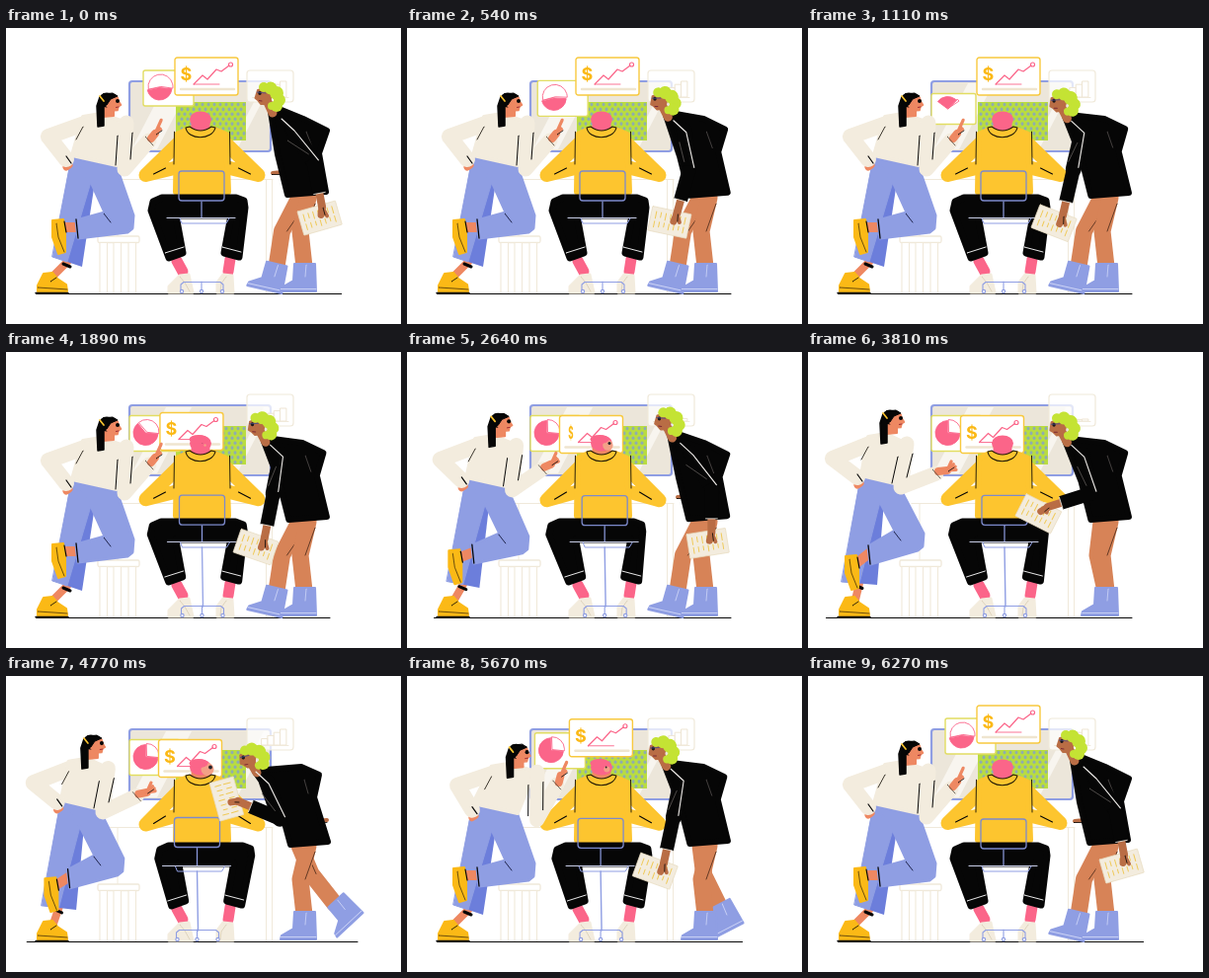
An HTML page with a canvas for the animation above (6300 ms loop, 400x300 px).

```html
<!DOCTYPE html>
<html lang="en">
<head>
<meta charset="utf-8">
<title>Team at a screen</title>
<style>
html, body { margin: 0; width: 100%; height: 100%; overflow: hidden; background: #fff; }
canvas { display: block; width: 400px; height: 300px; }
</style>
</head>
<body>
<canvas id="stage"></canvas>
<script>
const LOOP = 6300, STEP = 30;
const canvas = document.getElementById('stage');
const c = canvas.getContext('2d');
const ratio = window.devicePixelRatio || 1;
canvas.width = 400 * ratio;
canvas.height = 300 * ratio;

const BLUE = '#8f9ee3', DARK_BLUE = '#6c7edb', CREAM = '#f3ecde', LINE = '#f0e9da',
  YELLOW = '#fdc52f', GOLD = '#fbb916', BLACK = '#060606', PINK = '#fb6589',
  LIME = '#c4e334', CORAL = '#ee8862', BROWN = '#d78357', DEEP = '#b96d45', WHITE = '#fff';

// Motion helpers
const ease = (t, a, b) => {
  const u = Math.min(1, Math.max(0, (t - a) / (b - a)));
  return u * u * (3 - 2 * u);
};
const bump = (t, a, b, d, e) => ease(t, a, b) - ease(t, d, e);
const lerp = (a, b, u) => a.map((v, i) => v + (b[i] - v) * u);
const add = (p, x, y) => [p[0] + x, p[1] + y];

// Eases through a list of [time, pose] pairs
function follow(t, keys) {
  const i = Math.max(1, keys.findIndex(k => k[0] > t));
  const [a, from] = keys[i - 1], [b, to] = keys[i];
  return lerp(from, to, ease(t, a, b));
}

// Bent limb: the joint lies to the right of the line from root to tip
function joint(root, tip, upper, lower) {
  const dx = tip[0] - root[0], dy = tip[1] - root[1];
  const d = Math.min(Math.hypot(dx, dy), upper + lower);
  const along = (upper * upper - lower * lower + d * d) / (2 * d);
  const out = Math.sqrt(Math.max(0, upper * upper - along * along));
  const len = Math.hypot(dx, dy);
  return [root[0] + (dx * along + dy * out) / len, root[1] + (dy * along - dx * out) / len];
}

// Poses of the right woman: hand x, hand y, paper tilt, bend of the back
const OUT = [320, 181, -.28, 0], IN = [258, 190, .37, .47],
  REACH = [243, 157, .47, .47], SHOW = [235, 127, 1.3, 1];
// Her free foot: x, y, tilt
const STRIDE = [274, 238, .22], TOGETHER = [301, 238, 0], KICK = [333, 227, -.75];

function pose(t) {
  const [handX, handY, tilt, bend] = follow(t, [[0, OUT], [800, IN], [1700, IN], [3000, OUT],
    [3810, REACH], [4500, SHOW], [4850, SHOW], [5600, IN], [6250, OUT], [LOOP + 1, OUT]]);
  return {
    hand: [handX, handY], tilt, bend,
    paper: [handX - 5.5 * Math.cos(tilt) - 10.5 * Math.sin(tilt),
      handY - 5.5 * Math.sin(tilt) + 10.5 * Math.cos(tilt)],
    foot: follow(t, [[0, STRIDE], [2800, STRIDE], [3700, TOGETHER], [3950, TOGETHER],
      [4650, KICK], [5350, KICK], [6270, STRIDE], [LOOP + 1, STRIDE]]),
    lean: ease(t, 2000, 3250) - 1.45 * ease(t, 4560, 5600) + .45 * ease(t, 5650, 6270),
    sway: ease(t, 1400, 3300) - 2.5 * ease(t, 3300, 4800) + 1.5 * ease(t, 4900, LOOP),
    turn: .8 * bump(t, 1700, 2300, 2900, 3500) + bump(t, 4100, 4700, 5200, 6100),
    pole: bump(t, 1400, 2000, 5990, 6200),
    cardLow: bump(t, 1350, 2010, 5250, 5990),
    pieLow: bump(t, 100, 1000, 5310, 6270),
    pieHalf: bump(t, 500, 1050, 1150, 1700),
    share: .45 + .28 * bump(t, 1200, 2400, 5650, 6250),
    spin: Math.cos(2 * Math.PI * ease(t, 2400, 3300)),
    bars: .8 - .7 * bump(t, 1500, 2800, 3900, 4700)
  };
}

// Drawing helpers
function path(pts, close) {
  c.beginPath();
  for (let i = 0; i < pts.length; i += 2) c.lineTo(pts[i], pts[i + 1]);
  if (close) c.closePath();
}
function line(pts, color, width = 1) {
  path(pts);
  c.strokeStyle = color;
  c.lineWidth = width;
  c.stroke();
}
function poly(pts, color, soft = 0) {
  path(pts, true);
  c.fillStyle = color;
  c.fill();
  if (soft) {
    c.strokeStyle = color;
    c.lineWidth = soft;
    c.stroke();
  }
}
function oval(x, y, rx, ry, color) {
  c.beginPath();
  c.ellipse(x, y, rx, ry, 0, 0, 7);
  c.fillStyle = color;
  c.fill();
}
function box(x, y, w, h, r, fill, stroke, width = 1) {
  c.beginPath();
  c.roundRect(x, y, w, h, r);
  if (fill) { c.fillStyle = fill; c.fill(); }
  if (stroke) { c.strokeStyle = stroke; c.lineWidth = width; c.stroke(); }
}
function at(x, y, angle, draw) {
  c.save();
  c.translate(x, y);
  c.rotate(angle);
  draw();
  c.restore();
}

function drawScreen() {
  box(125, 54, 143, 71, 3, '#ece6da');
  for (const [x, w] of [[127, 26], [226, 8]])
    poly([x, 123, x + 35, 56, x + 35 + w, 56, x + w, 123], '#f8f5ef');
  box(125, 54, 143, 71, 3, null, BLUE, 2.2);
  box(172, 75, 71, 39, 0, '#b9dc40');
  for (let row = 0; row < 8; row++)
    for (let x = 175 + row % 2 * 3; x < 242; x += 6) oval(x, 77.5 + row * 4.9, 1.5, 1.8, '#8fadae');
}

function drawBars(p) {
  box(244, 43, 47, 32, 3, 'rgba(255,255,255,.75)', LINE, 1.2);
  for (let i = 0; i < 4; i++) {
    const h = (8 + i * 4) * p.bars;
    box(259 + i * 6.3, 70 - h, 6, h, 0, WHITE, '#eee5d3', 1);
  }
  line([249, 70.5, 286, 70.5], LINE);
}

function drawPie(p) {
  const x = 139 - 14 * p.pieLow, y = 43 + 21.5 * p.pieLow;
  box(x, y + 2 * p.pieHalf, 51 - 6 * p.pieHalf, 36 - 5 * p.pieHalf, 2, WHITE, '#e2dd62', 1.4);
  const wedge = (from, to, px, py, fill) => {
    c.beginPath();
    c.moveTo(px, py);
    c.arc(px, py, 12.5, from, to);
    c.closePath();
    c.fillStyle = fill;
    c.fill();
    c.strokeStyle = PINK;
    c.lineWidth = .9;
    c.stroke();
  };
  const px = x + 16.5, py = y + 17.5, full = 2 * Math.PI;
  const from = .1 - 2.6 * p.pieHalf, to = from + full * p.share * (1 - .4 * p.pieHalf);
  const end = from + full - 4.4 * p.pieHalf;
  wedge(to, Math.max(to, end), px + 1, py - 1, WHITE);
  wedge(from, to, px, py, PINK);
}

function drawChart(p) {
  at(171 - 16.5 * p.cardLow, 30 + 34.5 * p.cardLow, 0, () => {
    box(0, 0, 64, 38, 2.5, WHITE, '#f8c93f', 1.4);
    line([19, 27, 45, 27], PINK, .9);
    line([19, 27, 28, 18, 33, 22, 42, 12, 47, 14, 55, 8], PINK, 1.2);
    c.beginPath();
    c.arc(56.5, 7, 2, 0, 7);
    c.fillStyle = WHITE;
    c.fill();
    c.stroke();
    line([6, 32, 60, 32], '#efe5cf', 2.4);
    c.translate(11.5, 23);
    c.scale(p.spin, 1);
    c.font = '700 18px Inter, Arial, sans-serif';
    c.textAlign = 'center';
    c.fillStyle = GOLD;
    c.fillText('$', 0, 0);
  });
}

function drawFurniture() {
  line([105, 153.5, 270, 153.5], LINE, 1.2);
  line([113, 154, 113, 211], LINE);
  for (const x of [263.5, 269.5]) line([x, 154, x, 269], LINE);
  box(93, 211, 42, 6.5, 1.5, WHITE, LINE, 1.3);
  for (const x of [95, 109, 124]) box(x, 217.5, 7.5, 52, 0, WHITE, LINE, 1.1);
}

function drawMan(p) {
  const raise = 1.5 * p.turn;
  for (const side of [-1, 1]) {
    const x = dx => 198.5 + side * dx;
    line([x(21), 114, x(57), 149 + raise, x(24), 141], YELLOW, 14);
  }
  poly([173, 108, 184, 103, 211, 103, 223, 108, 225, 166, 172, 166], YELLOW, 6);
  for (const side of [-1, 1]) {
    const x = dx => 198.5 + side * dx;
    line([x(28), 105, x(28.5), 138], '#2b2108', 1);
    line([x(49), 148 + raise, x(37), 142], BLACK, 1.1);
  }

  const hx = 197, hy = 92.5, turn = p.turn;
  poly([hx - 9, hy, hx + 9, hy, hx + 10, 105, hx - 10, 105], turn > .3 ? CORAL : PINK);
  oval(hx, hy, 11, 8, PINK);
  if (turn > .05) {
    oval(hx + 4 + turn * 3, hy + 2, 6.5 * turn, 6.5 * turn, '#f3a187');
    oval(hx - 2, hy - 4, 9.5, 4.5, PINK);
    oval(hx + 10 * turn, hy, 1.9 * turn, 1.9 * turn, '#27242b');
  }
  c.beginPath();
  c.moveTo(182, 101);
  c.bezierCurveTo(184, 114, 209, 114, 212, 101);
  c.lineTo(208, 100);
  c.quadraticCurveTo(197, 108, 186, 100);
  c.closePath();
  c.fillStyle = YELLOW;
  c.fill();
  c.strokeStyle = '#1d1705';
  c.lineWidth = 1.1;
  c.stroke();

  // Feet and trousers
  line([173, 236, 179, 247], PINK, 11);
  line([227, 234, 225, 247], PINK, 11);
  poly([165, 268, 165, 262, 176, 251, 185, 250, 189, 268], CREAM, 3);
  poly([214, 268, 214, 258, 220, 250, 229, 251, 230, 268], CREAM, 3);
  line([176, 252, 181, 258, 186, 267], '#d9cdb5', .8);
  line([223, 252, 218, 259, 217, 267], '#d9cdb5', .8);
  const s = -4.5 * p.sway, f = s * .4;
  poly([158 + s, 172, 233 + s, 172, 241 + s, 175, 242 + s, 182, 236 + f, 232, 221 + f, 228, 228 + f, 190,
    172 + f, 190, 179 + f, 228, 165 + f, 233, 147 + s, 185, 149 + s, 176], BLACK, 7);
  line([161 + f, 228, 180 + f, 222], WHITE, .9);
  line([219 + f, 222, 238 + f, 227], WHITE, .9);
}

function drawChair(p) {
  const x = 175 + 3 * p.sway, y = 145 + p.sway, mid = x + 23, b = 177 + 3 * p.sway;
  box(x, y, 46, 30, 3, null, '#7d8acc', 1.3);
  line([mid, y + 31, mid, 192], BLUE, 1.2);
  line([x - 12, 192.5, x + 57, 192.5], '#c9cee8', 1.2);
  line([x + 1, 193, x + 3, 198, x + 48, 198, x + 51, 193], BLUE, 1);
  c.globalAlpha = p.pole;
  line([mid, 198, b + 22, 258], BLUE, 1.4);
  c.globalAlpha = 1;
  line([b, 266, b, 260, b + 3, 257.5, b + 40, 257.5, b + 43, 260, b + 43, 266], BLUE, 1.1);
  line([b + 21, 257, b + 21, 265], BLUE, 1.1);
  for (const dx of [1, 21, 42]) {
    oval(b + dx, 267, 2.2, 2.2, BLUE);
    oval(b + dx, 267, 1.1, 1.1, WHITE);
  }
}

function drawLeftWoman(p) {
  // Each point is a resting place plus its shift at full lean.
  const top = (x, y, dx, dy) => [x + dx * p.lean, y + dy * p.lean];
  const low = (x, y, dx, dy) => [x + dx * Math.max(0, p.lean), y + dy * Math.max(0, p.lean)];
  const wl = low(66, 130, -13, -4), wr = low(112, 141, -20, -5);
  const hemL = low(47, 232, -13, 1), hemR = low(77, 242, -7, -6);
  const [kx, ky] = low(128, 198, -12, -6), ankle = low(72, 204, -10, 2);
  const sl = top(78, 90, -17, -4), sr = top(122, 96, -22, -3);
  const hip = top(64, 139, -11, -6), backElbow = top(43, 110, -18, -2);
  const elbow = top(120, 143, -26, -6), wrist = top(145, 114, -15, 9), palm = top(151, 107, -10, 13);

  // Standing leg and shoe
  const hem = lerp(hemL, hemR, .5);
  line([...hem, 48, 251], CORAL, 8);
  line([hem[0] - 4, hem[1] + 2, hem[0] + 3, hem[1] + 5], BLACK, 3);
  poly([wl[0] + 10, wl[1] + 20, wl[0] + 24, wl[1] + 26, ...hemR, ...hem], DARK_BLUE);
  poly([...wl, wl[0] + 20, wl[1] + 26, ...hem, ...hemL], BLUE, 1);
  poly([32, 267, 32, 261, 38, 249, 47, 248, 52, 254, 61, 260, 62, 267], GOLD, 2);
  line([32, 263, 48, 264, 62, 265], '#4a3408', .8);
  line([45, 257, 51, 253], BLACK, .8);
  line([30, 268.5, 63, 268.5], BLACK, 1.3);

  // Crossed leg and raised shoe
  const raised = low(46, 194, -9, 12), [ax, ay] = ankle;
  line([ax, ay - 2, raised[0] + 12, raised[1] + 8], CORAL, 10);
  at(...raised, 0, () => {
    poly([1, 1, 12, 0, 14, 14, 14, 33, 7, 35, 1, 18], GOLD, 2);
    line([5, 4, 7, 18, 13, 33], '#4a3408', .8);
    line([13, 2, 15, 13], BLACK, 1.2);
  });
  poly([...wl, ...wr, kx + 1, ky - 8, kx, ky + 5, kx - 5, ky + 9, ax + 1, ay + 9, ax - 1, ay - 9,
    kx - 28, ky - 11, wl[0] + 20, wl[1] + 26], BLUE, 3);
  line([kx - 29, ky - 10, kx - 22, ky - 1], '#20254d', 1);
  line([ax - 1, ay - 10, ax + 1, ay + 9], BLACK, 1.3);

  // Sweater and the arm on the hip
  line([...hip, hip[0] - 3, hip[1] + 2], CORAL, 7);
  line([sl[0] + 4, sl[1] + 6, ...backElbow, hip[0] - 3, hip[1] - 6], CREAM, 16);
  poly([...sl, sl[0] + 18, sl[1] - 3, ...sr, sr[0] - 9, sr[1] + 15, wr[0], wr[1] - 2, wl[0] + 1, wl[1] - 1], CREAM, 4);
  line([sl[0], sl[1] + 10, sl[0] - 7, sl[1] + 23], '#3c372e', 1);
  line([hip[0] - 3, hip[1] - 9, hip[0] + 2, hip[1] - 2], BLACK, 1.2);
  line([...sr, ...elbow, ...wrist], CREAM, 15);
  line([sr[0] - 9, sr[1] + 13, elbow[0] - 9, elbow[1] - 4], BLACK, 1);
  line([sr[0] + 6, sr[1] + 10, elbow[0] + 6, elbow[1] - 10], BLACK, 1);

  // Hand: the pointing finger opens into a fan
  line([...add(wrist, 2, -2), ...palm], CORAL, 8);
  const fan = Math.max(0, p.lean);
  for (let i = 0; i < 4; i++) {
    const a = -1.15 + i * (.16 + .2 * fan), r = i ? 7 + 2 * fan : 15 - 5 * fan;
    line([...palm, palm[0] + r * Math.cos(a), palm[1] + r * Math.sin(a)], CORAL, 3.2);
  }
  line([palm[0] + 1, palm[1] + 1, palm[0] + 7, palm[1] - 3], BLACK, .8);
  line([wrist[0] - 4, wrist[1] - 4, wrist[0] + 4, wrist[1] + 5], '#4b4338', .8);

  at(...top(105, 76, -19, -7), 0, () => {
    poly([-6, 2, 4, 2, 4, 13, -7, 14], CORAL, 2);
    oval(-3, -3, 8, 7.5, BLACK);
    poly([-1, -5, 8, -6, 9, -2, 11.5, 2, 9, 3.5, 8, 7.5, 2, 8, -3, 3], CORAL, 1.5);
    poly([-7, -9, 3, -10, 8, -7, 1, -4, -3, 2, -8, 2], BLACK, 1);
    oval(8, -2, 2, 2.1, BLACK);
    line([6, 4.5, 9, 4], '#a32f35', 1);
    poly([-10, -6, -6, -4, -6, 23, -12, 24, -13, 3], BLACK, 1.5);
    line([-10, -7, -6, -2], YELLOW, 1.7);
  });
}

function drawBoot(x, y, angle) {
  at(x, y, angle, () => {
    poly([-10, 1, 11, 1, 12, 29, -24, 29, -23, 25, -11, 18], BLUE, 2);
    line([-24, 26.5, 12, 26.5], '#cfd6f7', .9);
    line([2, 2, 1, 14], '#cfd6f7', .8);
  });
}

function drawLeg(hip, x, y, angle) {
  const knee = [(hip + x) / 2 - 6, (172 + y) / 2 + 1];
  line([hip, 172, ...knee, x, y + 4], BROWN, 17);
  line([hip + 7, 178, knee[0] + 5, knee[1]], '#472817', .8);
  drawBoot(x, y, angle);
}

function drawRightWoman(p) {
  const bent = (x, y, dx, dy) => [x + dx * p.bend, y + dy * p.bend];
  drawLeg(297, ...p.foot);
  drawLeg(306, 302, 238, 0);

  const [dx] = bent(270, 0, 45, 0);
  line([dx, 147, dx + 10, 146], DEEP, 4);
  line([dx - 1, 148.5, dx + 10, 148.5], BLACK, .8);

  const collar = bent(268, 85, -16, 12), back = bent(301, 92, -2, 0), side = bent(317, 127, -5, -4);
  poly([...collar, collar[0] + 11, collar[1] - 2, ...back, ...bent(325, 104, -8, -4), ...side,
    ...bent(324, 166, 2, 2), ...bent(285, 169, 3, 2), ...bent(275, 128, 3, 6)], BLACK, 6);
  line([back[0] + 3, back[1] + 13, side[0] - 6, side[1] - 4], '#55504f', .8);

  const head = bent(261, 69, -16, 15);
  line([head[0] + 3, head[1] + 4, collar[0] + 2, collar[1] + 1], DEEP, 9);
  at(...head, -.35 * p.bend, () => {
    poly([-6, -6, 3, -8, 8, 0, 4, 8, -3, 8, -6, 4, -8.5, 2], DEEP, 2);
    for (const [x, y, r] of [[0, -9, 5], [7, -8, 6.5], [13, -3, 7], [16, 4, 6], [13, 10, 6], [8, 10, 4]]) oval(x, y, r, r, LIME);
    oval(-4, -3, 1.7, 2, '#18151a');
    line([-7, -4, 2, -3], '#4a4f84', .8);
    line([-5, 4.5, -2, 5], '#7b2833', 1);
    oval(5, 1, 1.8, 2.4, DEEP);
  });

  // Paper and the arm that holds it
  at(...p.paper, p.tilt, () => {
    box(-20, -12.5, 40, 25, .5, CREAM, '#e8dcc1', .7);
    for (let i = 0; i < 7; i++) {
      const x = -15 + i * 5;
      line([x, -8, x, -1 - i % 2 * 2], '#efca5b', 1);
      line([x, 2, x, 8 - i % 3], '#efca5b', 1);
    }
  });
  const h = p.hand, s = bent(290, 102, -26, 5), e = joint(s, h, 40, 46);
  const cuff = lerp(e, h, .7), grip = lerp(e, h, 1.12);
  line([...cuff, ...h], DEEP, 8);
  line([...h, ...add(grip, -2, 3)], DEEP, 7);
  line([...h, ...add(grip, 4, 4)], DEEP, 4);
  line([...add(h, 1, 1), ...add(grip, 2, 3)], BLACK, .8);
  line([...s, ...e], BLACK, 16);
  c.lineCap = 'butt';
  line([...lerp(s, e, .9), ...e, ...cuff], BLACK, 14);
  c.lineCap = 'round';
  const len = Math.hypot(h[0] - e[0], h[1] - e[1]);
  const nx = (e[1] - h[1]) / len * 6, ny = (h[0] - e[0]) / len * 6;
  line([cuff[0] + nx, cuff[1] + ny, cuff[0] - nx, cuff[1] - ny], '#e9e3d8', .9);
  line([...add(s, -11, -10), ...add(s, 2, 2), ...add(e, 5, -2)], '#f0edea', 1.1);
  line([...add(s, -5, 12), ...add(e, -5, -8)], '#6d6865', .7);
}

function render(t) {
  const p = pose(t);
  c.setTransform(ratio, 0, 0, ratio, 0, 0);
  c.fillStyle = WHITE;
  c.fillRect(0, 0, 400, 300);
  c.lineCap = c.lineJoin = 'round';
  drawScreen();
  drawBars(p);
  drawPie(p);
  drawChart(p);
  drawFurniture();
  // The floor spans whatever reaches furthest
  line([Math.min(30, 37 - 19 * p.lean), 269.5, Math.max(328, p.paper[0] + 22, p.foot[0] + 23), 269.5], BLACK, 1);
  drawMan(p);
  drawChair(p);
  drawLeftWoman(p);
  drawRightWoman(p);
}

const start = performance.now();
function tick() {
  const t = Math.max(0, performance.now() - start) % LOOP;
  render(Math.floor(t / STEP) * STEP);
  requestAnimationFrame(tick);
}
tick();
</script>
</body>
</html>
```
